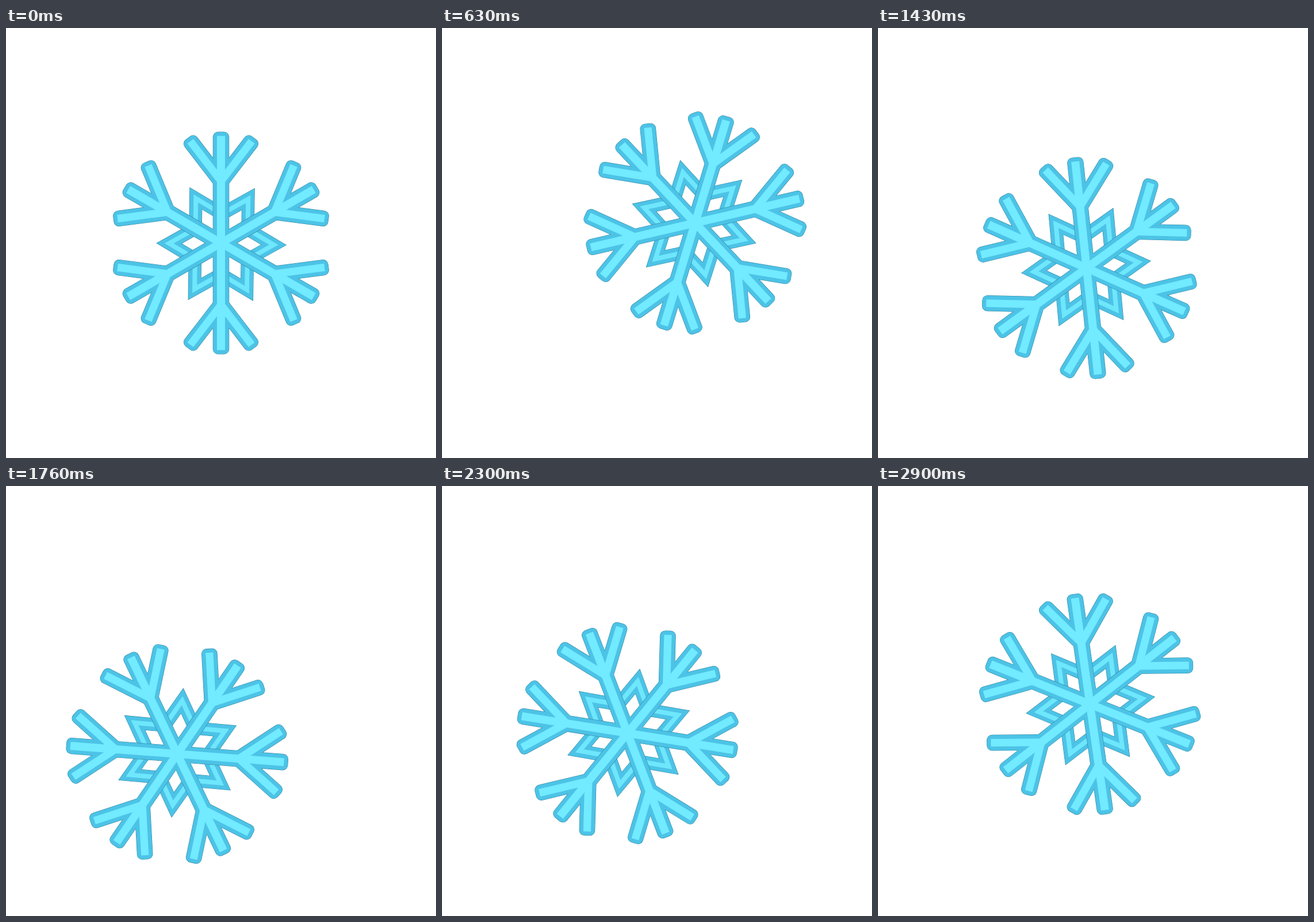
These frames come from a looping animation (748x748 px, 2940 ms). An HTML page:

```html
<!DOCTYPE html>
<html lang="en">
<head>
<meta charset="utf-8">
<title>Snowflake</title>
<style>
  html, body { margin: 0; height: 100%; overflow: hidden; background: #fff; }
  svg { display: block; width: 100%; height: 100%; }
  rect { rx: var(--round, 0px); }
  .edge { fill: #2a7a95; stroke: #2a7a95; --round: 2px; }
  .rim { fill: #4cc3e6; stroke: #4cc3e6; --round: 2px; }
  .ice { fill: #72eaff; stroke: none; }
  .arms { stroke-linejoin: round; }
  .star { fill: none; stroke-linejoin: miter; stroke-miterlimit: 4; }
</style>
</head>
<body>
<svg viewBox="0 0 748 748">
  <defs>
    <g id="arm">
      <rect x="-7" y="-186.3" width="14" height="186.3"/>
      <rect x="-6.6" y="-87.6" width="13.2" height="87.6" transform="translate(0 -107.6) rotate(37.5)"/>
      <rect x="-6.6" y="-87.6" width="13.2" height="87.6" transform="translate(0 -107.6) rotate(-37.5)"/>
    </g>
    <g id="arms"></g>
    <path id="star"/>
  </defs>
  <g id="flake">
    <g transform="translate(.7 1.9) rotate(.8)">
      <use href="#star" class="star edge" stroke-width="22.4"/>
      <use href="#star" class="star rim" stroke-width="21.4"/>
      <use href="#star" class="star" stroke="#6ee6fc" stroke-width="8"/>
    </g>
    <use href="#arms" class="arms edge" stroke-width="14.4"/>
    <use href="#arms" class="arms rim" stroke-width="13.4"/>
    <use href="#arms" class="arms ice"/>
  </g>
</svg>
<script>
  const LOOP = 2940, STEP = 100 / 3, LAST = 87, TURN = 89;
  const byId = id => document.getElementById(id);

  byId('arms').innerHTML = [0, 60, 120, 180, 240, 300]
    .map(a => `<use href="#arm" transform="rotate(${a})"/>`).join('');

  // Six-pointed star: outer and inner corners alternate every 30 degrees.
  const corners = Array.from({ length: 12 }, (_, i) => {
    const r = i % 2 ? 91 : 91 / Math.sqrt(3), a = i * Math.PI / 6;
    return `${(r * Math.sin(a)).toFixed(2)} ${(-r * Math.cos(a)).toFixed(2)}`;
  });
  byId('star').setAttribute('d', `M${corners.join('L')}Z`);

  // Drift legs: start and end step, start and end point, bow of the path.
  const legs = [
    { k: [0, 27], from: [374, 374], to: [467, 329.5], bow: [1, -4.3] },
    { k: [27, 54.5], from: [467, 329.5], to: [288, 473], bow: [0, 4.7] },
    { k: [54.5, TURN], from: [288, 473], to: [374, 374], bow: [-1.5, -1.5] }
  ];

  function place(k) {
    const { k: [a, b], from, to, bow } = legs.find(leg => k <= leg.k[1]);
    const u = (k - a) / (b - a);
    return from.map((p, i) => p + (to[i] - p) * u + 4 * bow[i] * u * (1 - u));
  }

  const flake = byId('flake');
  const start = performance.now();

  function draw() {
    const t = (performance.now() - start) % LOOP;
    const k = Math.min(LAST, Math.floor((t + 7) / STEP));
    const [x, y] = place(k);
    flake.setAttribute('transform', `translate(${x} ${y}) rotate(${360 * k / TURN})`);
    requestAnimationFrame(draw);
  }
  draw();
</script>
</body>
</html>
```
